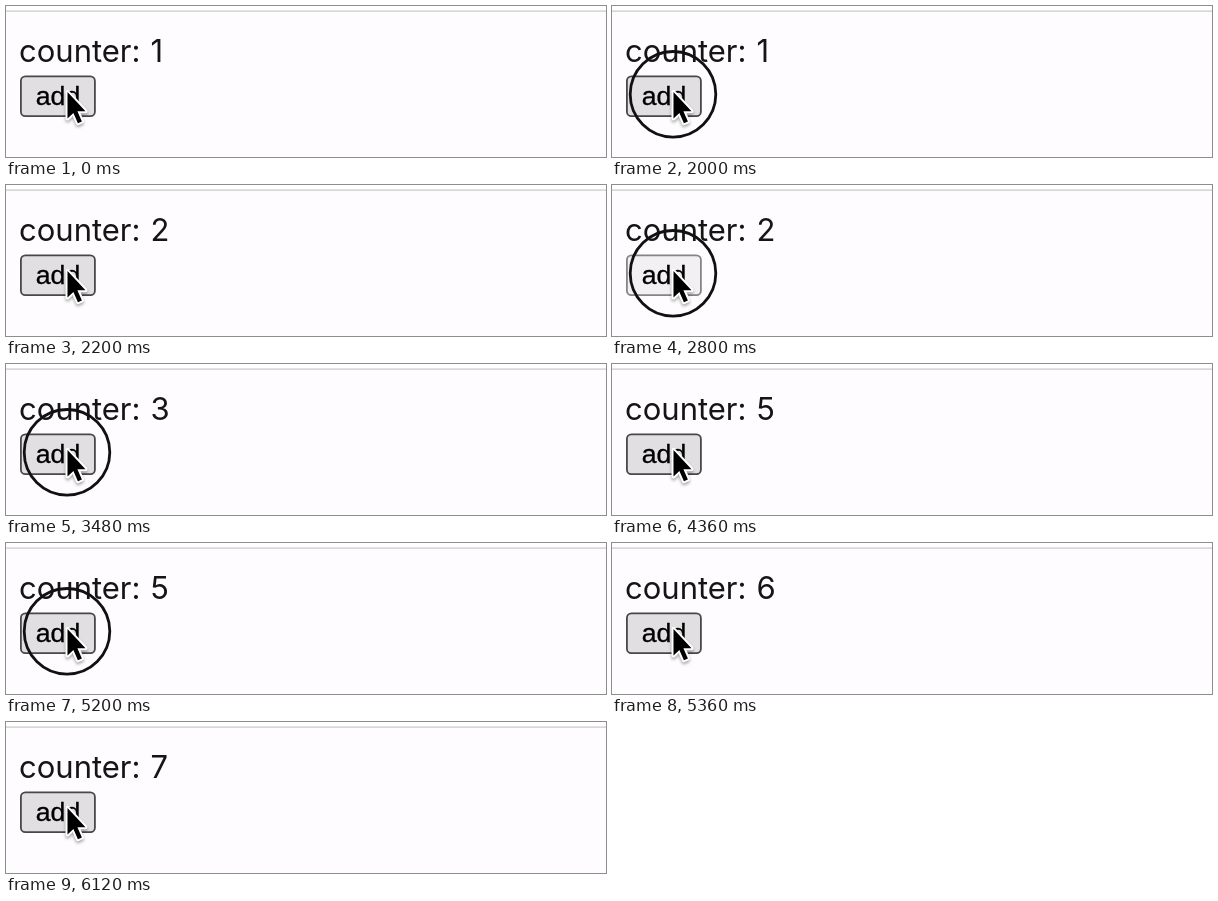
These frames come from a looping animation (600x151 px, 6800 ms). An HTML page:

```html
<!DOCTYPE html>
<html lang="en">
<head>
<meta charset="utf-8">
<title>Counter</title>
<style>
  html, body { margin: 0; width: 100%; height: 100%; overflow: hidden; background: #fefcfe; }
  svg { display: block; width: 600px; height: 151px; }
  .label { font: 31px Inter, "Liberation Sans", sans-serif; fill: #151515; }
  .caption { font: 26.67px "Liberation Sans", Arial, sans-serif; fill: #000; stroke: #000; stroke-width: .3; text-anchor: middle; }
  #button { fill: #e1dfe1; stroke: #484848; stroke-width: 1.8; }
  #button.pressed { fill: #f2f0f2; stroke: #858585; }
  #ring { fill: none; stroke: #111; stroke-width: 2.8; }
  .pointer { fill: #000; stroke: #fff; stroke-width: 4; stroke-linejoin: round; paint-order: stroke; filter: drop-shadow(0 2px 1.5px #0005); }
</style>
</head>
<body>
<svg viewBox="0 0 600 151">
  <rect width="600" height="4.5" fill="#fff"/>
  <rect y="4.5" width="600" height="1.2" fill="#cbc9cb"/>
  <text class="label" x="13" y="56">counter:</text>
  <text class="label" id="count" x="144.5" y="56">1</text>
  <rect id="button" x="14.9" y="70.4" width="74" height="39.8" rx="4.5"/>
  <text class="caption" x="52" y="99.3">add</text>
  <circle id="ring" cx="61" cy="88.3" r="42.8"/>
  <path class="pointer" d="M61.5 86V112.5L67.4 107L71.9 117.2L75.9 115.4L71.4 105.2H79.5Z"/>
</svg>
<script>
  const LOOP = 6800;
  // ring: visible span; press: button held down; the count rises on release
  const clicks = [
    { ring: [2000, 2200], press: [2040, 2160] },
    { ring: [2800, 2920], press: [2800, 2920] },
    { ring: [3480, 3640], press: [3520, 3600] },
    { ring: [4200, 4360], press: [4240, 4320] },
    { ring: [5200, 5360], press: [5240, 5320] },
    { ring: [6000, 6120], press: [6000, 6120] }
  ];
  const byId = id => document.getElementById(id);
  const count = byId("count"), button = byId("button"), ring = byId("ring");
  const start = performance.now();
  const within = (t, [from, to]) => t >= from && t < to;

  function draw() {
    const t = Math.max(0, performance.now() - start) % LOOP;
    count.textContent = 1 + clicks.filter(c => t >= c.press[1]).length;
    button.classList.toggle("pressed", clicks.some(c => within(t, c.press)));
    ring.style.visibility = clicks.some(c => within(t, c.ring)) ? "visible" : "hidden";
    requestAnimationFrame(draw);
  }
  draw();
</script>
</body>
</html>
```
